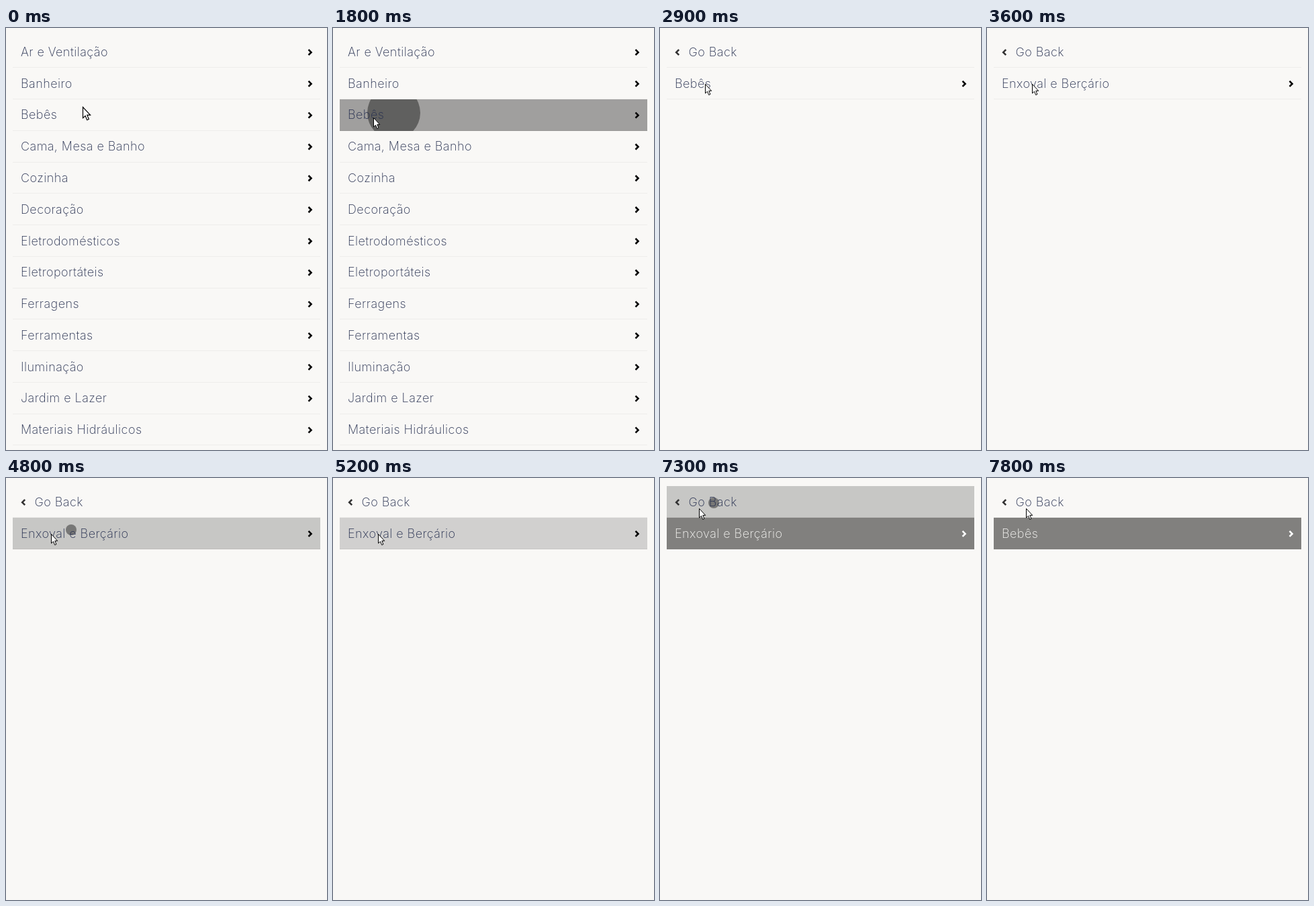
An HTML page with a canvas for the animation above (8000 ms loop, 478 px wide and 627 px high).

```html
<!DOCTYPE html>
<html lang="pt">
<head>
<meta charset="utf-8">
<style>
  html, body { margin: 0; width: 100%; height: 100%; overflow: hidden; background: #f9f8f6; }
  canvas { display: block; }
</style>
</head>
<body>
<canvas id="stage" width="478" height="627"></canvas>
<script>
const ctx = document.getElementById('stage').getContext('2d');
const LOOP = 8000, STEP = 100;
const LEFT = 10, WIDTH = 458, TOP = 11.95, ROW = 46.77;
const INK = '#273050', LINE = '#eeedeb', FOCUS = '#81807e';

const categories = ['Ar e Ventilação', 'Banheiro', 'Bebês', 'Cama, Mesa e Banho', 'Cozinha',
  'Decoração', 'Eletrodomésticos', 'Eletroportáteis', 'Ferragens', 'Ferramentas',
  'Iluminação', 'Jardim e Lazer', 'Materiais Hidráulicos'];

const pages = [
  { from: 0, items: categories, root: true },
  { from: 2200, items: ['Bebês'], fade: true },
  { from: 3600, items: ['Enxoval e Berçário'] },
  { from: 5500, items: ['Capitonê para Quarto do Bebê'], count: 2 },
  { from: 6800, items: ['Enxoval e Berçário'], focused: true },
  { from: 7700, items: ['Bebês'], focused: true },
];

// Each press tints its row and spreads a ripple from (x, y).
const presses = [
  { start: 1700, end: 2200, row: 2, x: 90.5, y: 126 },
  { start: 3200, end: 3600, row: 1, x: 97, y: 77 },
  { start: 4800, end: 5500, row: 1, x: 97, y: 77 },
  { start: 6400, end: 6900, row: 0, x: 80, y: 37 },
  { start: 7300, end: 7800, row: 0, x: 80, y: 37 },
];
const tintKeys = [[0, .2], [100, .36], [200, .39], [300, .3], [400, .16]];
const rippleKeys = [[0, .4], [100, .4], [200, .225], [300, .1], [400, 0]];
const radiusKeys = [[0, 8], [100, 39.5], [200, 91], [300, 150], [400, 220]];

const cursorKeys = [[1000, 114, 118], [1400, 62, 135], [1600, 62, 135], [1700, 60, 133],
  [2600, 60, 133], [2900, 67, 83], [5400, 67, 83], [5700, 60, 49], [5800, 60, 49], [6000, 58, 45]];

function keyed(keys, t, column = 1) {
  if (t <= keys[0][0]) return keys[0][column];
  for (let i = 1; i < keys.length; i++) {
    const a = keys[i - 1], b = keys[i];
    if (t <= b[0]) return a[column] + (b[column] - a[column]) * (t - a[0]) / (b[0] - a[0]);
  }
  return keys[keys.length - 1][column];
}

const rowTop = row => Math.floor(TOP + row * ROW) + 1;

function text(string, x, y, color, size = 18, align = 'left') {
  ctx.font = `250 ${size}px Inter, "Open Sans", sans-serif`;
  ctx.letterSpacing = '0.45px';
  ctx.textAlign = align;
  ctx.fillStyle = color;
  ctx.fillText(string, x, y);
}

function chevron(x, y, direction, color) {
  ctx.beginPath();
  ctx.moveTo(x - 2.2 * direction, y - 4);
  ctx.lineTo(x + 1.8 * direction, y);
  ctx.lineTo(x - 2.2 * direction, y + 4);
  ctx.strokeStyle = color;
  ctx.lineWidth = 2.6;
  ctx.stroke();
}

function divider(y) {
  ctx.fillStyle = LINE;
  ctx.fillRect(LEFT, y, WIDTH, 1);
}

function drawPress(press, t) {
  const age = t - press.start, top = rowTop(press.row);
  ctx.save();
  ctx.beginPath();
  ctx.rect(LEFT, top, WIDTH, rowTop(press.row + 1) - top);
  ctx.clip();
  ctx.fillStyle = `rgba(0,0,0,${keyed(tintKeys, age)})`;
  ctx.fillRect(LEFT, top, WIDTH, ROW + 1);
  ctx.fillStyle = `rgba(0,0,0,${keyed(rippleKeys, age)})`;
  ctx.beginPath();
  ctx.arc(press.x, press.y, keyed(radiusKeys, age), 0, 2 * Math.PI);
  ctx.fill();
  ctx.restore();
}

function drawPage(page, t) {
  const firstRow = page.root ? 0 : 1;
  const rows = page.items.length + firstRow;
  for (let row = 0; row < rows; row++) {
    divider(rowTop(row + 1) - 1 + (page.count && row === 1 ? 5 : 0));
  }
  if (page.focused) {
    ctx.fillStyle = FOCUS;
    ctx.fillRect(LEFT, rowTop(1), WIDTH, rowTop(2) - rowTop(1));
  }
  presses.filter(p => t >= p.start && t < p.end).forEach(p => drawPress(p, t));

  ctx.globalAlpha = page.fade ? Math.min(1, .5 + (t - page.from) / 400) : 1;
  if (!page.root) {
    chevron(26, 36.2, -1, '#333');
    text('Go Back', 42.5, 42, INK);
  }
  page.items.forEach((item, i) => {
    const middle = TOP + (i + firstRow) * ROW + 24.2;
    text(item, 22, Math.round(middle + 5.8), page.focused ? '#f9f8f6' : INK);
    if (page.count) text(page.count, 457, 93, '#555', 21, 'right');
    else chevron(452.7, middle, 1, page.focused ? '#fff' : '#000');
  });
  ctx.globalAlpha = 1;
}

function drawCursor(t) {
  const x = t < 400 ? 114 : keyed(cursorKeys, t, 1);
  const y = t < 400 ? 117 : keyed(cursorKeys, t, 2);
  const scale = t < 400 ? 1.2 : 1;
  ctx.save();
  ctx.translate(x + .5, y + .5);
  ctx.scale(scale, scale);
  ctx.fillStyle = '#fff';
  ctx.strokeStyle = '#000';
  ctx.lineWidth = 1;
  const arrow = new Path2D('M0 0V13.5L3 10.8L5.2 16L7.4 15L5.3 9.9H9.2Z');
  ctx.fill(arrow);
  ctx.stroke(arrow);
  ctx.restore();
}

function draw(now) {
  const t = Math.floor(now % LOOP / STEP) * STEP;
  ctx.fillStyle = '#f9f8f6';
  ctx.fillRect(0, 0, 478, 627);
  drawPage(pages.findLast(page => t >= page.from), t);
  drawCursor(t);
}

let start;
function tick(now) {
  start ??= now;
  draw(Math.max(0, now - start));
  requestAnimationFrame(tick);
}
requestAnimationFrame(tick);
</script>
</body>
</html>
```
